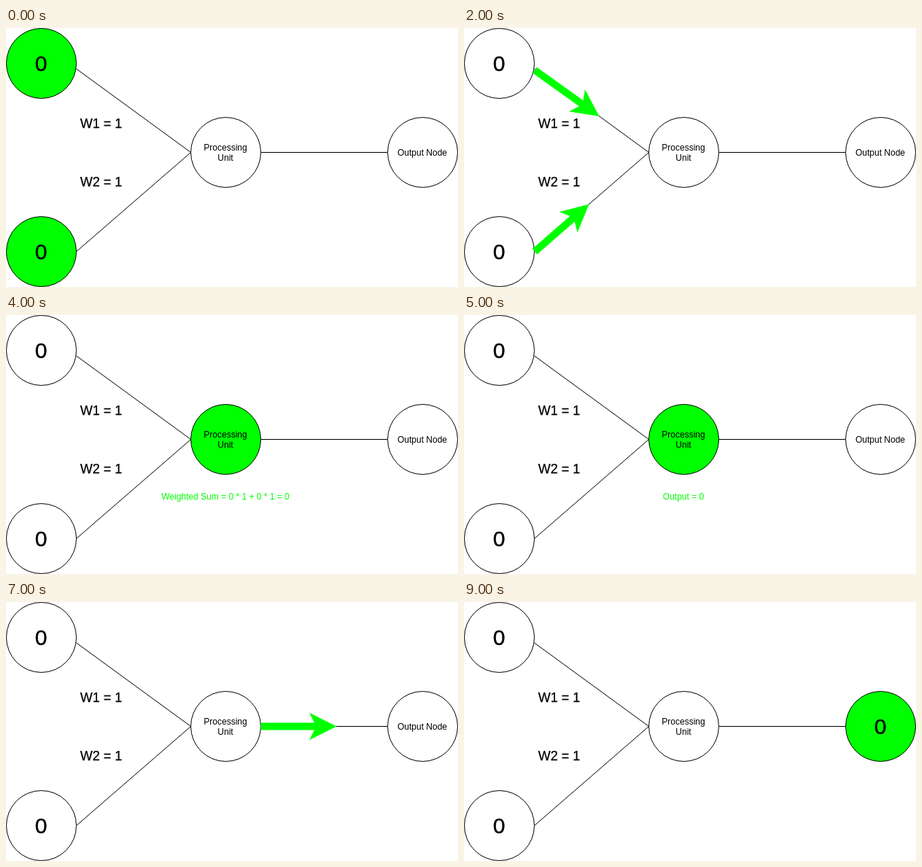
An HTML page for the animation above (10 s loop, 620 px wide and 355 px high).

```html
<!DOCTYPE html>
<html lang="en">
<head>
<meta charset="utf-8">
<title>Perceptron</title>
<style>
  html, body { margin: 0; width: 100%; height: 100%; overflow: hidden; background: #fff; }
  svg { display: block; font: 12px "Liberation Sans", Arial, sans-serif; text-anchor: middle; }
  circle, line { stroke: #000; fill: #fff; }
  .big { font-size: 30px; stroke: #000; stroke-width: .4; }
  .weight { font-size: 18px; stroke: #000; stroke-width: .25; }
  .on, #arrows, #note { fill: #0f0; }
</style>
</head>
<body>
<svg width="620" height="355" viewBox="0 0 620 355">
  <line x1="96.5" y1="56" x2="253.5" y2="170.5"/>
  <line x1="96.5" y1="306.5" x2="253.5" y2="170.5"/>
  <line x1="349.5" y1="170.5" x2="523.5" y2="170.5"/>
  <circle class="input" cx="48.5" cy="48.5" r="48"/>
  <circle class="input" cx="48.5" cy="306.5" r="48"/>
  <circle id="unit" cx="301.5" cy="170.5" r="48"/>
  <circle id="output" cx="571.5" cy="170.5" r="48"/>
  <g id="arrows"></g>
  <text class="big" x="48" y="59">0</text>
  <text class="big" x="48" y="317">0</text>
  <text class="weight" x="130.5" y="137">W1 = 1</text>
  <text class="weight" x="130.5" y="217">W2 = 1</text>
  <text x="301" y="168">Processing</text>
  <text x="301" y="182">Unit</text>
  <text id="result" y="175"></text>
  <text id="note" x="301" y="253"></text>
</svg>
<script>
const STEP = 1000, STEPS = 10;
const find = id => document.getElementById(id);

// Thick arrow as a horizontal shape, turned towards its tip
function arrow([x1, y1], [x2, y2]) {
  const length = Math.hypot(x2 - x1, y2 - y1);
  const angle = Math.atan2(y2 - y1, x2 - x1) * 180 / Math.PI;
  const shaftEnd = Math.max(0, length - 25);
  return `<g transform="translate(${x1} ${y1}) rotate(${angle})">
    <path d="M0-5H${shaftEnd}V5H0z"/>
    <path d="M${length} 0l-37.5-18.75 9.4 18.75-9.4 18.75z"/></g>`;
}

const upper = [97, 57.7], lower = [97, 306.5], right = [349.5, 170.5];
const arrowsAt = {
  1: [[upper, [119, 72]], [lower, [116.5, 288.5]]],
  2: [[upper, [185.5, 121]], [lower, [171.5, 241.5]]],
  3: [[upper, [253.5, 170.5]], [lower, [253.5, 170.5]]],
  6: [[right, [382.5, 170.5]]],
  7: [[right, [453.5, 170.5]]],
  8: [[right, [523.5, 170.5]]]
};
const noteAt = { 4: "Weighted Sum = 0 * 1 + 0 * 1 = 0", 5: "Output = 0" };

function show(step) {
  const done = step === 9;
  document.querySelectorAll(".input").forEach(c => c.classList.toggle("on", step === 0));
  find("unit").classList.toggle("on", step === 4 || step === 5);
  find("output").classList.toggle("on", done);
  find("arrows").innerHTML = (arrowsAt[step] || []).map(ends => arrow(...ends)).join("");
  find("note").textContent = noteAt[step] || "";
  const result = find("result");
  result.textContent = done ? "0" : "Output Node";
  result.setAttribute("class", done ? "big" : "");
  result.setAttribute("x", 571);
  result.setAttribute("y", done ? 181 : 175);
}

const start = performance.now();
let shown = -1;
function tick() {
  const step = Math.floor((performance.now() - start) / STEP) % STEPS;
  if (step !== shown) show(shown = step);
  requestAnimationFrame(tick);
}
tick();
</script>
</body>
</html>
```
